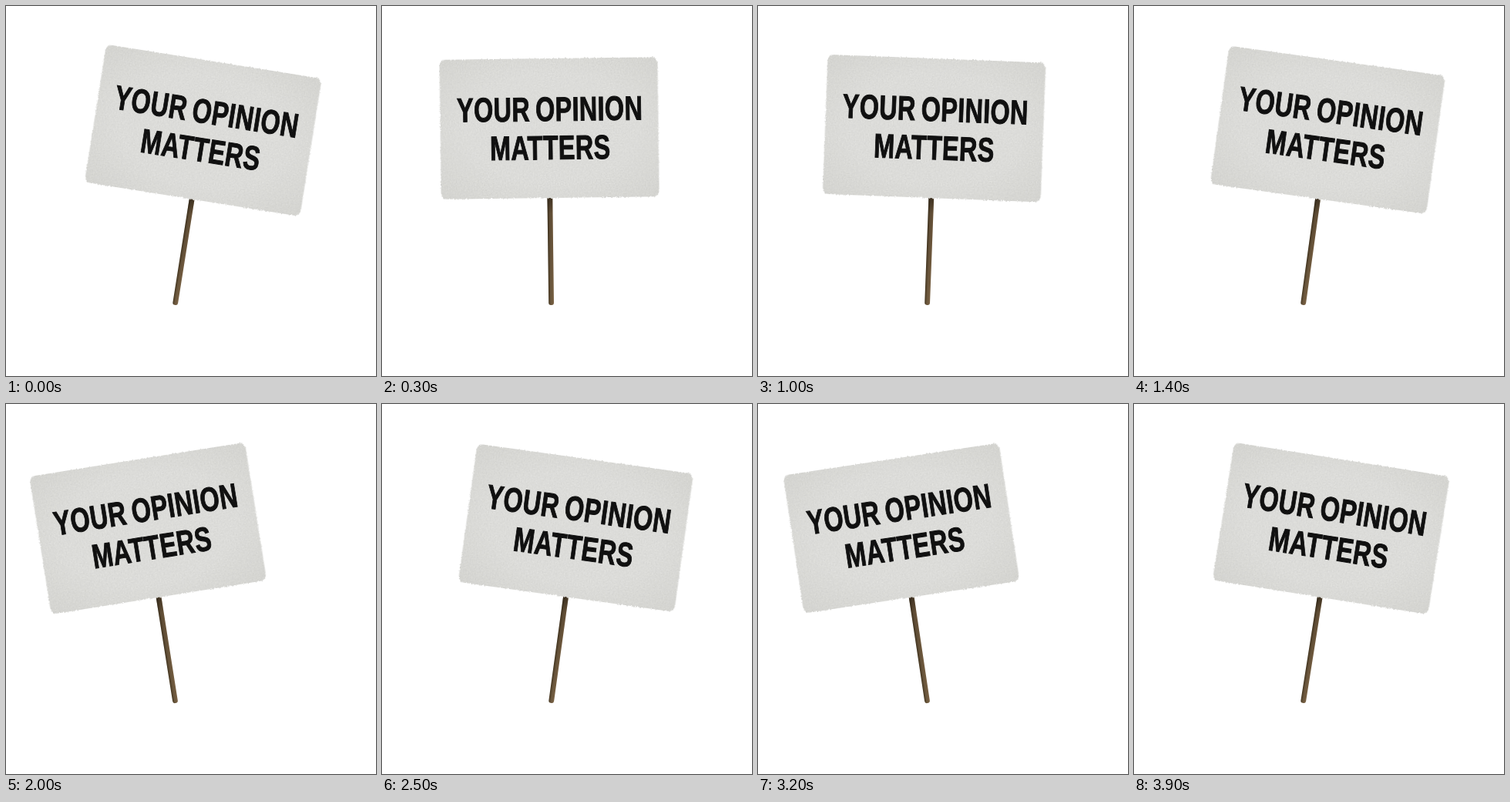
Write an HTML page that moves like this. It is 480x480 px and loops after 4000 ms.

```html
<!DOCTYPE html>
<html lang="en">
<head>
<meta charset="utf-8">
<title>Your opinion matters</title>
<style>
  html, body { margin: 0; width: 100%; height: 100%; overflow: hidden; background: #fff; }
  svg { display: block; width: 100%; height: 100%; }
  text {
    font: bold 44px "Liberation Sans", Arial, sans-serif;
    letter-spacing: .5px;
    word-spacing: -3px;
    text-anchor: middle;
    fill: #101010;
    stroke: #101010;
    stroke-width: 1;
  }
</style>
</head>
<body>
<svg viewBox="0 0 480 480">
  <defs>
    <linearGradient id="wood">
      <stop offset="0" stop-color="#43351f"/>
      <stop offset=".4" stop-color="#6b573d"/>
      <stop offset="1" stop-color="#7a6244"/>
    </linearGradient>
    <linearGradient id="shade" x2="0" y2="1">
      <stop offset="0" stop-color="#1c150c" stop-opacity=".6"/>
      <stop offset=".15" stop-color="#1c150c" stop-opacity=".2"/>
      <stop offset="1" stop-color="#1c150c" stop-opacity="0"/>
    </linearGradient>
    <radialGradient id="paper" r=".72">
      <stop offset=".55" stop-color="#e3e3e0"/>
      <stop offset="1" stop-color="#dadad6"/>
    </radialGradient>
    <filter id="cloth" x="-3%" y="-3%" width="106%" height="106%" color-interpolation-filters="sRGB">
      <feTurbulence type="fractalNoise" baseFrequency=".6" numOctaves="2" seed="4" result="noise"/>
      <feDisplacementMap in="SourceGraphic" in2="noise" scale="3" xChannelSelector="R" yChannelSelector="G" result="board"/>
      <feColorMatrix in="noise" values="0 0 0 0 0  0 0 0 0 0  0 0 0 0 0  .1 0 0 0 -.02"/>
      <feComposite in2="board" operator="in"/>
      <feMerge>
        <feMergeNode in="board"/>
        <feMergeNode/>
      </feMerge>
    </filter>
  </defs>
  <g id="sign">
    <g id="stick" transform="translate(-.4 0)">
      <rect x="-3.4" y="-145" width="6.8" height="147" rx="3" fill="url(#wood)"/>
      <rect x="-3.4" y="-138" width="6.8" height="140" rx="3" fill="url(#shade)"/>
    </g>
    <rect x="-141.5" y="-318" width="283" height="181" rx="8" fill="url(#paper)" filter="url(#cloth)"/>
    <!-- condensed lettering -->
    <g transform="translate(.8 -237) scale(.735 1)">
      <text>YOUR OPINION</text>
      <text y="50">MATTERS</text>
    </g>
  </g>
</svg>
<script>
  const LOOP = 4000, STEP = 100, SWINGS = 3, LEAD = 50, TILT = 9.3;
  const sign = document.getElementById("sign");

  function draw() {
    const time = Math.floor(performance.now() % LOOP / STEP) * STEP;
    const angle = TILT * Math.cos(2 * Math.PI * SWINGS * (time + LEAD) / LOOP);
    sign.setAttribute("transform", `translate(220 386) rotate(${angle.toFixed(3)})`);
    requestAnimationFrame(draw);
  }
  draw();
</script>
</body>
</html>
```
